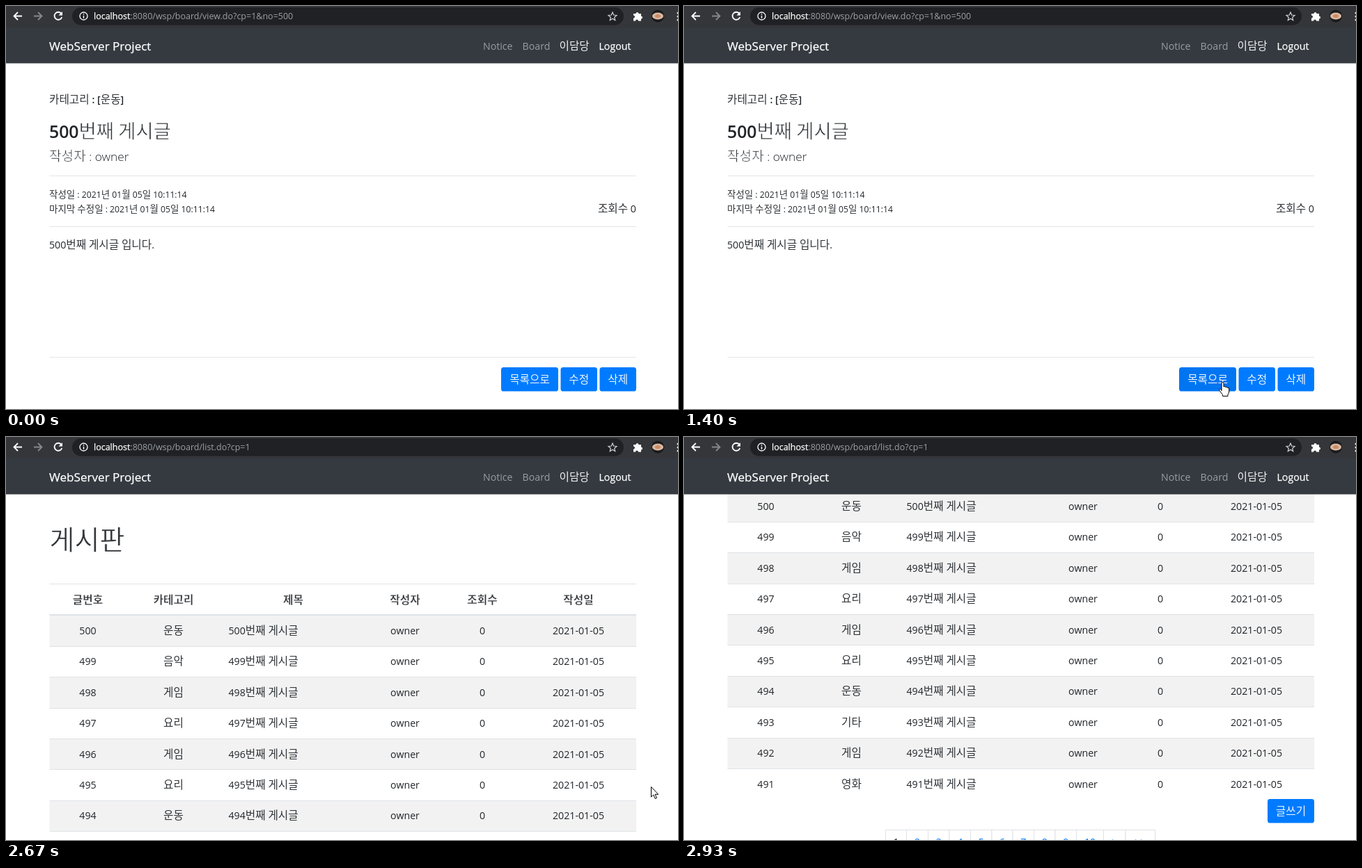
An HTML page that plays this animation: 965x580 px, repeating every 2960 ms.

```html
<!DOCTYPE html>
<html lang="ko">
<head>
<meta charset="utf-8">
<title>WebServer Project</title>
<style>
  html, body { margin: 0; width: 100%; height: 100%; overflow: hidden; background: #fff; }
  svg { display: block; }
  text { font: 14px "Open Sans", "Noto Sans", sans-serif; fill: #212529; white-space: pre; }
  .k { font-family: "Noto Sans CJK KR", "Noto Sans CJK", sans-serif; font-size: 1.105em; font-weight: 350; fill-opacity: .92; }
  .bold, .bold .k { font-weight: 700; }
  .semi { font-weight: 600; }
  .light, .light .k { font-weight: 300; }
  /* A page-coloured outline slims the strokes. */
  .thin .k { stroke: #fff; stroke-width: .6; }
  .bold .k { stroke: #fff; stroke-width: .3; }
  .mid { text-anchor: middle; }
  .end { text-anchor: end; }
  .white { fill: #fff; }
  .bright { fill: #fff; stroke: #fff; stroke-width: .25; }
  .dim { fill: #9a9da0; }
  .link { fill: #007bff; }
  .icon { fill: none; stroke: #fff; stroke-width: 1.8; }
</style>
</head>
<body>
<svg width="965" height="580" viewBox="0 0 965 580">
  <g id="view"></g>
  <g id="list"></g>

  <g id="nav"><rect y="31" width="965" height="51.500" fill="#343a40"/></g>

  <rect width="965" height="31" fill="#35363a"/>
  <rect x="95" y="2" width="792" height="25.500" rx="12.750" fill="#202124"/>
  <g class="icon">
    <path d="M23 14.500H11.500M17 9l-5.500 5.500L17 20"/>
    <path d="M40 14.500h11.500M46 9l5.500 5.500L46 20" stroke="#85878a"/>
    <g id="reload">
      <path d="M79.300 10.700A5.500 5.500 0 1 0 80.300 16"/>
      <path d="M81 8v5.500h-5.500z" fill="#fff" stroke="none"/>
    </g>
    <path id="stop" d="M70 9.500l10 10M80 9.500l-10 10"/>
    <circle cx="111.500" cy="14.500" r="5.500" stroke-width="1.300"/>
    <path d="M111.500 13.700v4M111.500 11v1.500" stroke-width="1.400"/>
    <path d="M871 9l1.700 4 4.300.400-3.300 2.800 1 4.300-3.700-2.300-3.700 2.300 1-4.300-3.300-2.800 4.300-.400z"
          stroke="#d0d2d5" stroke-width="1.200"/>
  </g>
  <path d="M901 11h3.500a2 2 0 0 1 4 0h3.500v3.500a2 2 0 0 1 0 4v3h-4a2 2 0 0 0-4 0h-3v-4a2 2 0 0 0 0-4z" fill="#fff"/>
  <circle cx="936" cy="14.500" r="9" fill="#191a1c"/>
  <ellipse cx="936" cy="14.500" rx="8" ry="5" fill="#d9b8a0"/>
  <ellipse cx="936" cy="14.500" rx="4" ry="2.500" fill="#c98b66"/>
  <g fill="#fff"><circle cx="965" cy="10" r="1.500"/><circle cx="965" cy="15" r="1.500"/><circle cx="965" cy="20" r="1.500"/></g>
  <text x="126" y="19" class="bright" style="font-size:12.5px">localhost<tspan id="path" fill="#9aa0a6" stroke="none"></tspan></text>

  <g id="status">
    <path d="M0 568H195q3.500 0 3.500 3.500V580H0z" fill="#35363a"/>
    <text x="2" y="580.500" style="font-size:10.6px;fill:#c4c7cb">localhost:8080/wsp/board/list.do?cp=1</text>
  </g>

  <g id="cursor" fill="#fff" stroke="#000" stroke-linejoin="round">
    <path id="arrow" d="M.5.500V15l3.300-3 2.400 5.500 2.300-1-2.400-5.200h4.600z"/>
    <path id="hand" d="M-2 13V2Q-2 .500-.500.500T1 2V7Q2.500 5.800 3.700 7.500 5.300 6.500 6.300 8.300 8.700 7.800 8.700 10V14Q8.500 16.500 7 18V20.500H-.500V18.500L-5 12.500Q-6 10.500-4.500 10-3.500 10-2 12"/>
  </g>
</svg>

<script>
const $ = id => document.getElementById(id);
const LEFT = 62.5, RIGHT = 905, WIDTH = RIGHT - LEFT, ROW = 44.4;

// Hangul runs get their own family and a slightly larger size.
const text = (x, y, str, cls = '', size = 14.2) =>
  `<text x="${x}" y="${y}" class="${cls}" style="font-size:${size}px">` +
  str.replace(/[가-힣]+/g, run => `<tspan class="k">${run}</tspan>`) + '</text>';
const rect = (x, y, w, h, fill, more = '') =>
  `<rect x="${x}" y="${y}" width="${w}" height="${h}" fill="${fill}" ${more}/>`;
const rule = (y, color, h = 1) => rect(LEFT, y, WIDTH, h, color);
const button = (x, y, w, label, id = '') =>
  rect(x, y, w, 34.5, '#007bff', `rx="3.6" id="${id}"`) + text(x + w / 2, y + 23, label, 'mid white');

$('nav').innerHTML +=
  text(62, 64, 'WebServer Project', 'bright', 17.1) +
  text(685, 63, 'Notice', 'dim') + text(741.5, 63, 'Board', 'dim') +
  text(794.5, 63, '이담당', 'white') + text(851.5, 63, 'Logout', 'bright');

$('view').innerHTML =
  text(62, 140, '카테고리 : [운동]', 'semi') +
  text(62, 190, '500번째 게시글', 'semi thin', 24.8) +
  text(62, 222.5, '작성자 : owner', 'light thin', 17.3) +
  text(62, 275.5, '작성일 : 2021년 01월 05일 10:11:14', '', 12.2) +
  text(62, 297, '마지막 수정일 : 2021년 01월 05일 10:11:14', '', 12.2) +
  text(RIGHT, 297, '조회수 0', 'end') +
  text(62, 348.5, '500번째 게시글 입니다.') +
  [244, 317, 505].map(y => rule(y, '#e5e5e5')).join('') +
  rect(709.6, 518.6, 84.8, 37.4, 'none', 'rx="5" id="ring" stroke="#268fff" stroke-opacity=".5" stroke-width="2.9"') +
  button(711, 520, 82, '목록으로', 'toList') +
  button(796.5, 520, 52.5, '수정') + button(852.5, 520, 52.5, '삭제');

const columns = [117.5, 240.5, 412.5, 573, 684, 822];
const headings = ['글번호', '카테고리', '제목', '작성자', '조회수', '작성일'];
const categories = '운동 음악 게임 요리 게임 요리 운동 기타 게임 영화'.split(' ');
const rowTop = i => Math.round(256.4 + i * ROW);

function tableRow(category, i) {
  const y = rowTop(i), no = 500 - i, base = Math.round(284 + i * ROW);
  const cells = [`${no}`, category, '', 'owner', '0', '2021-01-05'];
  return (i % 2 ? '' : rule(y, '#f2f2f2', rowTop(i + 1) - y)) +
    (i ? rule(y, '#dee2e6') : '') +
    cells.map((cell, c) => text(columns[c], base, cell, 'mid')).join('') +
    text(319.5, base, `${no}번째 게시글`);
}

const pageEdges = [289.5, 319.5, 350.5, 381, 411.5, 442, 472, 502.5, 533, 563.5, 602.5, 634, 676.5];
const pages = [1, 2, 3, 4, 5, 6, 7, 8, 9, 10, '&gt;', '&gt;&gt;'];
const pager = pages.map((label, i) => {
  const x = pageEdges[i], w = pageEdges[i + 1] - x;
  return rect(x, 744.5, w, 34.5, '#fff', 'stroke="#dee2e6"') +
    text(x + w / 2, 766.5, `${label}`, i ? 'mid link' : 'mid');
}).join('');

$('list').innerHTML =
  text(62.5, 161.5, '게시판', 'thin', 35.4) +
  rule(211, '#dee2e6') +
  headings.map((label, c) => text(columns[c], 239.5, label, 'mid bold')).join('') +
  categories.map(tableRow).join('') +
  rule(255, '#dee2e6', 2) +
  button(838, 700, 67, '글쓰기') + pager;

// Pointer stops: time, x, y
const stops = [
  [533, 890, 324], [633, 622, 291], [733, 622, 291], [900, 785, 476], [1033, 785, 476],
  [1367, 774, 541], [2033, 774, 541], [2367, 942, 514], [2500, 926, 503],
  [2833, 926, 503], [2900, 948, 502]
];
const clamp = v => Math.min(1, Math.max(0, v));
const ramp = (t, a, b) => clamp((t - a) / (b - a));
const smooth = u => u * u * (3 - 2 * u);
const mix = (a, b, u) => a + (b - a) * u;
const show = (id, on) => $(id).style.display = on ? '' : 'none';

function pointerAt(t) {
  const i = Math.max(1, stops.findIndex(s => s[0] >= t));
  const last = t >= stops.at(-1)[0];
  const [a, b] = last ? stops.slice(-2) : [stops[i - 1], stops[i]];
  const u = smooth(ramp(t, a[0], b[0]));
  return [mix(a[1], b[1], u), mix(a[2], b[2], u)].map(Math.round);
}

function draw(ms) {
  const t = Math.floor((ms % 2960 + 4) * .03) / .03;   // 30 steps per second
  const onList = t > 1920, loading = t > 1860 && !onList;
  show('view', !onList);
  show('list', onList);
  show('stop', loading);
  show('reload', !loading);
  $('path').textContent = ':8080/wsp/board/' + (t > 1860 ? 'list.do?cp=1' : 'view.do?cp=1&no=500');

  const hover = ramp(t, 1345, 1500), press = ramp(t, 1790, 1900);
  $('toList').setAttribute('fill',
    `rgb(0,${mix(123, 105, hover) - 7 * press},${mix(255, 217, hover) - 13 * press})`);
  $('ring').style.opacity = press;
  $('status').style.opacity = ramp(t, 1490, 1630) * (1 - ramp(t, 2040, 2200));

  const scroll = Math.round(1.4 - 180.4 * smooth(ramp(t, 2650, 2941)));
  $('list').setAttribute('transform', `translate(0 ${scroll})`);

  const overButton = t > 1345 && t < 2050;
  show('cursor', t > 530 && t < 2920);
  show('hand', overButton);
  show('arrow', !overButton);
  $('cursor').setAttribute('transform', `translate(${pointerAt(t)})`);
}

const start = performance.now();
function tick() {
  draw(performance.now() - start);
  requestAnimationFrame(tick);
}
tick();
</script>
</body>
</html>
```
